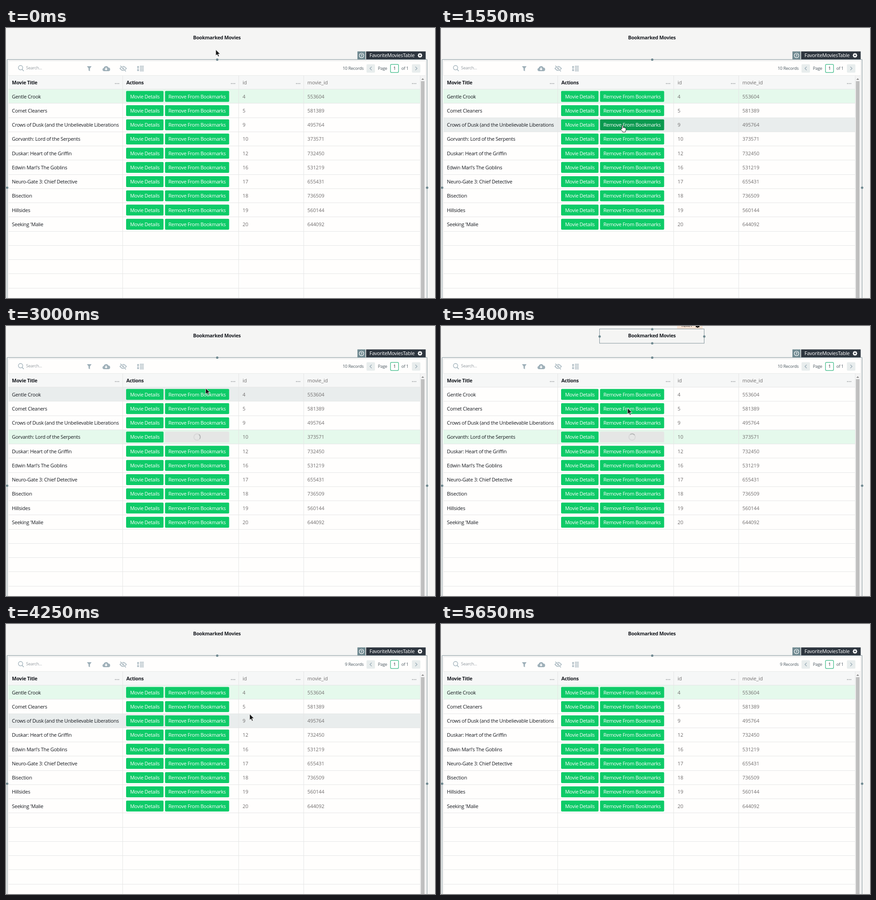
An HTML page for the animation above (7150 ms loop, 943x594 px).

```html
<!DOCTYPE html>
<html lang="en">
<head>
<meta charset="utf-8">
<title>Bookmarked Movies</title>
<style>
  html, body { margin: 0; width: 100%; height: 100%; overflow: hidden; background: #f5f5f4; }
  svg { display: block; }
  text { font: 11px "Open Sans", "Noto Sans", sans-serif; letter-spacing: -.28px; fill: #16191f; white-space: pre; }
  .bold { font-size: 10.8px; font-weight: 700; letter-spacing: -.3px; }
  .small { font-size: 9.5px; fill: #4b5860; }
  .num { letter-spacing: -.1px; fill: #716e6e; }
  .head { fill: #716e6e; font-weight: 500; letter-spacing: -.1px; }
  .btn { fill: #fff; text-anchor: middle; }
  .line { stroke: #82949b; fill: none; }
  .dot { fill: #6f8990; }
  .icon { fill: #9fb0b9; }
  .pen { fill: none; stroke: #9fb0b9; stroke-width: 1.5; }
</style>
</head>
<body>
<svg width="943" height="594" viewBox="0 0 943 594">
  <defs>
    <clipPath id="cell"><rect x="6" y="105" width="242" height="489"/></clipPath>
    <path id="gear" d="M-1-5H1L1.4-3.5 3-4.3 4.3-3 3.5-1.4 5-1V1L3.5 1.4 4.3 3 3 4.3 1.4 3.5 1 5H-1L-1.4 3.5-3 4.3-4.3 3-3.5 1.4-5 1V-1L-3.5-1.4-4.3-3-3-4.3-1.4-3.5ZM0-1.8A1.8 1.8 0 1 0 0 1.8 1.8 1.8 0 1 0 0-1.8Z" fill-rule="evenodd"/>
    <path id="arrow" d="M0 0V13.6L3.1 10.7 5.3 15.6 7.6 14.6 5.4 9.8H9.8Z" fill="#161616" stroke="#fff" stroke-width=".9"/>
    <path id="hand" d="M-1.2 8V1.2a1.2 1.2 0 0 1 2.4 0V5.2q1.2-.8 2.2.3 1.3-.7 2.1.5 2-.6 2 1.3V10q0 2-1.2 3.2V15H.2V13.6L-3.8 9.4q-.5-1.6 1-1.6Z" fill="#fff" stroke="#222" stroke-width="1"/>
  </defs>

  <text class="bold" x="463.5" y="25.4" text-anchor="middle">Bookmarked Movies</text>
  <rect x="772.5" y="51.5" width="17.5" height="17.5" fill="#6f8990"/>
  <circle cx="781.5" cy="60.5" r="5" fill="none" stroke="#fff" stroke-width="1.2"/>
  <text x="781.5" y="63.6" text-anchor="middle" style="font-size:8.5px;font-weight:700;fill:#fff">?</text>
  <rect x="791.5" y="51.5" width="131" height="17.5" fill="#2d353e"/>
  <text x="799" y="64.2" style="fill:#fff">FavoriteMoviesTable</text>
  <use href="#gear" x="910" y="60.3" fill="#fff"/>

  <rect x="5" y="72" width="917" height="522" fill="#fffefd"/>
  <path class="line" d="M5.5 594V72.5H922.5V594" style="stroke:#ececec"/>

  <circle class="pen" cx="32" cy="87.3" r="4.8" style="stroke-width:1.3"/>
  <path class="pen" d="M35.5 91 39 94.8"/>
  <text class="small" x="44" y="91.4" style="fill:#939aa0">Search...</text>
  <path class="icon" d="M178 84H188L184.5 89V95L181.5 93.5V89Z"/>
  <path class="icon" d="M215 95a3.6 3.6 0 0 1-.2-7 5.3 5.3 0 0 1 10-1 4 4 0 0 1 .2 8Z"/>
  <path d="M219 87H221V89.8H223.5L220 93.3 216.5 89.8H219Z" fill="#fff"/>
  <path class="pen" d="M250.5 89q7-9 14 0-7 9-14 0Z"/>
  <circle class="icon" cx="257.5" cy="89" r="2.4"/>
  <path d="M252 83 264 96" stroke="#fffefd" stroke-width="3"/>
  <path class="pen" d="M251.5 83 263.5 95.5"/>
  <path class="pen" d="M294 84.2H303M294 87.5H303M294 90.8H303M294 94.2H303M290.3 85V94"/>
  <path class="icon" d="M287.8 86.5 290.3 83 292.8 86.5ZM287.8 92 290.3 95.5 292.8 92Z"/>

  <g fill="#e8eded"><rect x="792.5" y="79.7" width="18.5" height="18.5" rx="2"/><rect x="892.3" y="79.7" width="18.5" height="18.5" rx="2"/></g>
  <path class="pen" d="M803.8 85.2 800 89 803.8 92.8M899.8 85.2 903.6 89 899.8 92.8"/>
  <text class="small" x="817.5" y="92.2">Page</text>
  <rect x="845.2" y="80.2" width="17.6" height="17.6" rx="2" fill="#fff" stroke="#31b680" stroke-width="1.2"/>
  <text class="small" x="854" y="92.2" text-anchor="middle" style="fill:#222">1</text>
  <text class="small" x="869" y="92.2">of 1</text>

  <g id="scene"></g>

  <path class="line" d="M2.4 594V69.3H925.6V594"/>
  <g class="dot"><circle cx="464.3" cy="69.5" r="2.6"/><circle cx="2.5" cy="351.3" r="2.6"/><circle cx="925.7" cy="351.3" r="2.6"/></g>
  <g id="overlay"></g>
</svg>
<script>
const LOOP = 7150, STEP = 50, TOP = 134.5, PITCH = 31.25;
const CLICK = 2450, BUSY = 3700, BACK = 4100, DONE = 4250;
const movies = [
  ["Gentle Crook", 4, 553604],
  ["Comet Cleaners", 5, 581389],
  ["Crows of Dusk (and the Unbelievable Liberations of Miss Plum)", 9, 495764],
  ["Gorvanth: Lord of the Serpents", 10, 373571],
  ["Duskar: Heart of the Griffin", 12, 732450],
  ["Edwin Marl's The Goblins", 16, 531219],
  ["Neuro-Gate 3: Chief Detective", 17, 655431],
  ["Bisection", 18, 736509],
  ["Hillsides", 19, 560144],
  ["Seeking 'Malie", 20, 644092]
];
const fewer = movies.filter((m, i) => i !== 3);

// Pointer path: time, x, y
const path = [
  [0, 461, 47.5], [650, 461, 47.5], [700, 427, 106], [850, 427, 106], [900, 421, 118],
  [1200, 388.5, 180.5], [1250, 388.5, 180.5], [1550, 399, 214], [1600, 399, 214],
  [1700, 401, 241.5], [1900, 401, 241.5], [1950, 416.5, 250], [CLICK, 416.5, 250],
  [2650, 432, 405], [2750, 432, 400], [3050, 440, 84], [3150, 446, 22], [3200, 446, 24],
  [3400, 410, 180.5], [3800, 534.5, 198], [3850, 534.5, 198], [3900, 535.5, 198],
  [5100, 535.5, 198], [5150, 534.5, 198], [5350, 566, 158], [5600, 624, 31], [LOOP, 624, 31]
];

function pointer(t) {
  const i = path.findIndex(p => p[0] > t), [t0, x0, y0] = path[i - 1], [t1, x1, y1] = path[i];
  const k = (t - t0) / (t1 - t0);
  return [x0 + (x1 - x0) * k, y0 + (y1 - y0) * k];
}

const rect = (x, y, w, h, fill, rx = 0) =>
  `<rect x="${x}" y="${y}" width="${w}" height="${h}" fill="${fill}" rx="${rx}"/>`;
const text = (x, y, s, cls = "", extra = "") => `<text x="${x}" y="${y}" class="${cls}" ${extra}>${s}</text>`;
const dot = (x, y) => `<circle class="dot" cx="${x}" cy="${y}" r="2.6"/>`;
const rowY = i => Math.floor(TOP + PITCH * i);

const plate = (x, y, w, fill) => rect(x, y - 12, w, 24, fill, 2);

function button(x, y, w, label, dark) {
  return plate(x, y, w, dark ? "#0b994f" : "#0ecb68") + text(x + w / 2, y + 4, label, "btn");
}

function spinner(x, y, t) {
  return `<g transform="translate(${x} ${y})" fill="none" stroke-width="2"><circle r="7" stroke="#d8d8d8"/>
    <path d="M0-7A7 7 0 0 1 7 0" stroke="#b4b6b6" transform="rotate(${t * .72 - 684})"/></g>`;
}

function table(t, list, hover, hand) {
  const picked = t >= CLICK && t < DONE ? 3 : 0;
  let s = rect(5, 105, 906, 30, "#f6f7f7");
  list.forEach(([name, id, movieId], i) => {
    const y = rowY(i), mid = TOP + PITCH * i + 16;
    if (i === picked || i === hover)
      s += rect(5, y + 1, 906, rowY(i + 1) - y, i === picked ? "#e5f9ec" : "#e9eded");
    s += text(13, mid + 4, name, "", 'clip-path="url(#cell)"') + button(264, mid, 82.3, "Movie Details");
    s += t >= CLICK && t < BUSY && i === 3
      ? plate(349.5, mid, 141, "#e5e6e5") + spinner(420, mid, t)
      : button(349.5, mid, 141, "Remove From Bookmarks", hand && i === hover);
    s += text(520, mid + 4, id, "num") + text(662.5, mid + 4, movieId, "num");
  });
  for (let i = 0; i < 15; i++) s += rect(5, rowY(i), 906, 1, "#e5e6e6");
  for (const x of [256, 511, 654, 910]) s += rect(x, 105, 1, 489, "#e5e6e6");
  for (const x of [239.5, 494.5, 637.5, 892.5])
    for (let k = 0; k < 3; k++) s += rect(x + k * 3.6, 121.2, 2, 2, "#8b8f92", 1);
  s += text(13, 124, "Movie Title", "bold") + text(264.5, 124, "Actions", "bold");
  s += text(520, 124, "id", "head") + text(662.5, 124, "movie_id", "head");
  return s + rect(911, 105, 11, 489, "#f4f4f4") + rect(912, 117, 8, 477, "#bfbfbf") +
    '<path d="M913 114 916 110.5 919 114Z" fill="#8b8b8b"/>';
}

function headingFrame() {
  return '<rect class="line" x="348.5" y="6.5" width="230" height="31.5"/>' +
    dot(464.3, 7) + dot(464.3, 38) + dot(348.7, 23) + dot(578.7, 23) +
    rect(519, -11, 56, 17, "#f8e4d4") + text(527, 2, "Text1") +
    '<use href="#gear" x="564" y="-1.2"/>';
}

const scene = document.getElementById("scene"), overlay = document.getElementById("overlay");

function draw(t) {
  const [x, y] = pointer(t);
  const list = t < DONE ? movies : fewer;
  const stale = t >= 3100 && t < 3450, gone = t >= 5650;
  const hand = t >= 1500 && t < CLICK;
  const hover = stale || gone ? -1 : Math.floor((y - TOP) / PITCH);
  const busy = t >= BUSY && t < BACK;
  scene.innerHTML = text(786, 92.2, list.length + " Records", "small", 'text-anchor="end"') +
    rect(5, 104, 917, 1, "#e8e9e9") +
    (busy ? rect(5, 105, 917, 489, "#f0f1f3") : table(t, list, hover, hand));
  overlay.innerHTML = (t >= 3150 && t < 3450 ? headingFrame() : "") +
    (gone ? "" : `<use href="#${hand ? "hand" : "arrow"}" x="${x}" y="${y}"/>`);
}

const start = performance.now();
let last = -1;
function tick() {
  const t = Math.floor((performance.now() - start) % LOOP / STEP) * STEP;
  if (t !== last) draw(last = t);
  requestAnimationFrame(tick);
}
tick();
</script>
</body>
</html>
```
